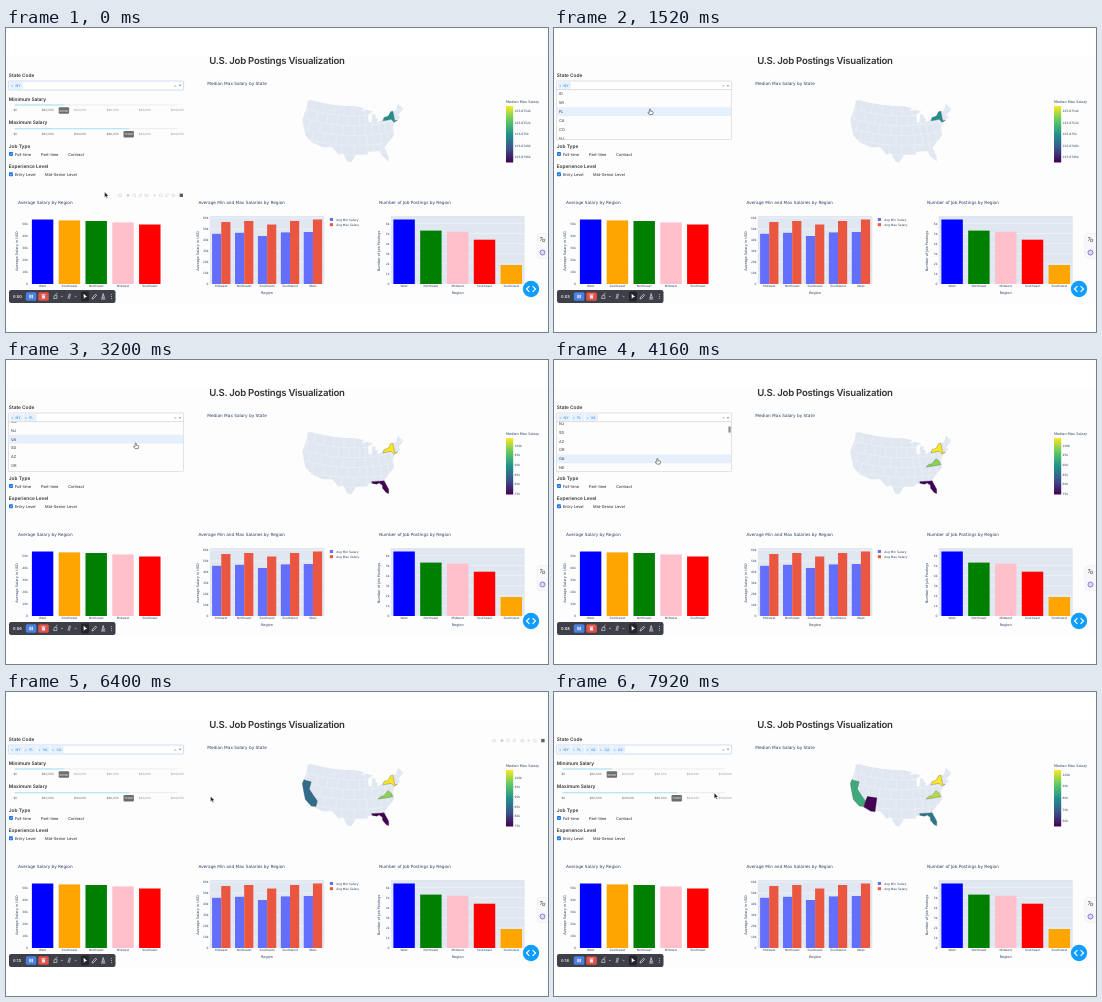
Recreate the animation shown at these times as an HTML page. Size 542 by 304 pixels, loop 8000 ms.

```html
<!DOCTYPE html>
<html lang="en">
<head>
<meta charset="utf-8">
<title>U.S. Job Postings Visualization</title>
<style>
html, body { margin: 0; width: 100%; height: 100%; overflow: hidden; background: #fff; }
svg { display: block; width: 100vw; height: 100vh; font-family: Inter, "Liberation Sans", sans-serif; text-rendering: geometricPrecision; }
.p { font-family: "DejaVu Sans", sans-serif; fill: #2a3f5f; }
</style>
</head>
<body>
<svg id="stage" viewBox="0 0 542 304">
  <defs>
    <clipPath id="menuClip"><rect x="2" y="61.9" width="176" height="49.6"/></clipPath>
    <clipPath id="landClip"></clipPath>
    <linearGradient id="scale" x1="0" y1="1" x2="0" y2="0"></linearGradient>
  </defs>
  <g id="page"></g>
  <g id="map"></g>
  <g id="picker"></g>
  <g id="bar"></g>
  <g id="tools"></g>
  <g id="pointer"></g>
</svg>
<script>
const LOOP = 8000;
const PALE = '#e0e7f1';
const $ = id => document.getElementById(id);

// ---------- helpers ----------
const text = (x, y, size, str, attrs = '') => `<text x="${x}" y="${y}" font-size="${size}" ${attrs}>${str}</text>`;
const plot = (x, y, size, str, attrs = '') => text(x, y, size, str, 'class="p" ' + attrs);
const rect = (x, y, w, h, fill, attrs = '') => `<rect x="${x}" y="${y}" width="${w}" height="${h}" fill="${fill}" ${attrs}/>`;
const line = (d, stroke, w, attrs = '') => `<path d="${d}" fill="none" stroke="${stroke}" stroke-width="${w}" ${attrs}/>`;
const mid = 'text-anchor="middle"', end = 'text-anchor="end"';
const ease = u => { u = Math.min(1, Math.max(0, u)); return u * u * (3 - 2 * u); };
const within = (spans, t) => spans.some(([a, b]) => t >= a && t < b);

// ---------- map ----------
const rad = Math.PI / 180;
const n = (Math.sin(29.5 * rad) + Math.sin(45.5 * rad)) / 2;
const C = Math.cos(29.5 * rad) ** 2 + 2 * n * Math.sin(29.5 * rad);
function albers(west, lat) {
  const r = 140 * Math.sqrt(C - 2 * n * Math.sin(lat * rad)) / n;
  const a = n * (96 - west) * rad;
  return (348 + r * Math.sin(a)).toFixed(2) + ' ' + (r * Math.cos(a) - 76.1).toFixed(2);
}
// closed outline in degrees west and north; edges follow the projection
function geo(pts) {
  const out = [];
  for (let i = 0; i < pts.length; i += 2) {
    const j = (i + 2) % pts.length;
    for (let u = 0; u < 1; u += .2) out.push(albers(pts[i] + (pts[j] - pts[i]) * u, pts[i + 1] + (pts[j + 1] - pts[i + 1]) * u));
  }
  return 'M' + out.join('L') + 'Z';
}

const coast = [124.7,48.4, 122.8,49, 95.2,49, 89.6,48, 92.1,46.8, 88.2,47.3, 84.6,46.4, 87.8,45.2, 87.8,42, 86.3,42,
  85.4,45.3, 83.4,45.1, 83.8,43.8, 82.5,43, 83.4,41.7, 79,42.8, 76.3,43.6, 74.7,45, 71.4,45.1, 69.2,47.4, 67,44.8,
  70.8,43, 70,41.7, 74,40.5, 75.2,38.2, 75.6,35.3, 81.3,31.3, 80.1,27, 80.4,25.2, 82.8,27.8, 84,30.1, 89.6,30.2,
  89.2,29.1, 95,29.2, 97.3,26, 99.1,26.5, 101,29.6, 103.2,29, 106.5,31.8, 111.1,31.3, 117.1,32.5, 120.6,34.5,
  124.4,40.4, 124,46.2];
const states = {
  NY: { pay: 103.9, shape: [79.8,42, 79,43.2, 76.3,43.5, 74.7,45, 73.3,45, 73.5,41, 72,41, 74,40.5, 75.3,42] },
  FL: { pay: 74.8, shape: [87.5,31, 81.6,30.7, 80.1,27, 80.4,25.2, 81.5,25.8, 82.8,27.8, 82.7,29, 84,30.1, 85.3,29.7, 87.5,30.3] },
  VA: { pay: 98.7, shape: [83.6,36.6, 75.9,36.5, 76.3,38, 77.8,39.3, 80.3,37.5, 82,37.5] },
  CA: { pay: 85.2, shape: [124.2,42, 120,42, 120,39, 114.6,35, 114.7,32.7, 117.1,32.5, 120.6,34.5, 124.4,40.4] },
  AZ: { pay: 55.6, shape: [114,37, 109,37, 109,31.3, 111.1,31.3, 114.8,32.5, 114.5,35] }
};

const viridis = ['440154', '3b528b', '21918c', '5ec962', 'fde725'];
$('scale').innerHTML = viridis.map((c, i) => `<stop offset="${i / 4}" stop-color="#${c}"/>`).join('');
function shade(u) {
  const i = Math.min(3, Math.floor(u * 4)), f = u * 4 - i;
  const ch = (c, k) => parseInt(c.substr(2 * k, 2), 16);
  return `rgb(${[0, 1, 2].map(k => Math.round(ch(viridis[i], k) * (1 - f) + ch(viridis[i + 1], k) * f))})`;
}

function land() {
  const outline = `<path d="${geo(coast)}" fill="${PALE}"/>`;
  $('landClip').innerHTML = outline;
  // state lines: bands of four degrees, cells narrower towards the east
  let grid = '';
  for (let lat = 29, k = 0; lat < 49; lat += 4, k++) {
    for (let w = 126 - k % 2 * 3; w > 67; w -= w > 95 ? 6 : 3.6) {
      const step = w > 95 ? 6 : 3.6;
      grid += `M${albers(w, lat + 4)}L${albers(w, lat)}L${albers(w - step, lat)}`;
    }
  }
  return outline + line(grid, '#f6f9fc', .35, 'clip-path="url(#landClip)"');
}

function colored(codes) {
  const pays = codes.map(c => states[c].pay), lo = Math.min(...pays), hi = Math.max(...pays);
  let s = codes.map(c => {
    const u = hi > lo ? (states[c].pay - lo) / (hi - lo) : .5;
    return `<path d="${geo(states[c].shape)}" fill="${shade(u)}" stroke="#444" stroke-width=".3"/>`;
  }).join('');
  const tick = (y, label) => plot(508.6, y + 1.1, 3, label);
  if (hi === lo) {
    for (let d = 4; d >= -4; d -= 2) s += tick(106.2 - d * 5.75, (103.875 + d / 1e4).toFixed(d ? 4 : 3) + 'k');
  } else {
    const gap = hi - lo > 35 ? 10 : 5;
    for (let v = Math.ceil(lo / gap) * gap; v <= hi; v += gap) s += tick(134.3 - 56.3 * (v - lo) / (hi - lo), v + 'k');
  }
  return s;
}

// ---------- bar charts ----------
const hue = { West: 'blue', Southwest: 'orange', Northeast: 'green', Midwest: 'pink', Southeast: 'red' };
function axes(x, w, gap, unit, title, fill = PALE) {
  let s = rect(x, 188, w, 68, fill);
  for (let i = 0, y = 256; y > 188; i++, y -= gap) {
    s += line(`M${x} ${y}h${w}`, '#fff', .35) + plot(x - 1.3, y + 1.1, 3, i ? i * unit + 'k' : 0, end);
  }
  return s + plot(0, 0, 3.5, title, `${mid} transform="translate(${x - 11} 223)rotate(-90)"`);
}
function simpleBars(x, names, tops) {
  return names.map((name, i) => rect(x + 26.8 * (i + .1), tops[i], 21.44, 256 - tops[i], hue[name])
    + plot(x + 26.8 * (i + .5), 259.4, 3, name, mid)).join('');
}
function charts() {
  const first = 23.2, second = 203.8, third = 384.7;
  let s = plot(12, 175.8, 4.25, 'Average Salary by Region') + plot(192.5, 175.8, 4.25, 'Average Min and Max Salaries by Region')
    + plot(373, 175.8, 4.25, 'Number of Job Postings by Region');
  s += axes(first, 134, 12, 10, 'Average Salary in USD', 'none')
    + simpleBars(first, ['West', 'Southwest', 'Northeast', 'Midwest', 'Southeast'], [191.5, 192.4, 193, 194.4, 196.5]);
  s += axes(second, 114.6, 11, 10, 'Average Salary in USD');
  const low = [205.8, 204.8, 208, 204.4, 204], high = [194, 193, 196.5, 193, 191.5];
  ['Midwest', 'Northeast', 'Southeast', 'Southwest', 'West'].forEach((name, i) => {
    const x = second + 22.92 * i;
    s += rect(x + 2.29, low[i], 9.17, 256 - low[i], '#636efa') + rect(x + 11.46, high[i], 9.17, 256 - high[i], '#ea5640')
      + plot(x + 11.46, 259.4, 3, name, mid);
  });
  s += axes(third, 134, 10.1, 1, 'Number of Job Postings')
    + simpleBars(third, ['West', 'Northeast', 'Midwest', 'Southeast', 'Southwest'], [191.5, 202.6, 203.7, 211.7, 237]);
  s += plot(261, 266, 3.5, 'Region', mid) + plot(451.7, 266, 3.5, 'Region', mid);
  ['Min', 'Max'].forEach((kind, i) => s += rect(323.8, 190 + 5.2 * i, 3.2, 3, i ? '#ea5640' : '#636efa')
    + plot(330.3, 192.6 + 5.2 * i, 3, `Avg ${kind} Salary`));
  return s;
}

// ---------- filters ----------
function slider(y, value) {
  const to = 9.3 + 162 * value / 100000;
  let s = rect(8.5, y - .5, 163, 1, '#ececec', 'rx=".5"') + rect(8.5, y - .5, to - 8.5, 1, '#abe2fb', 'rx=".5"');
  for (let i = 0; i < 6; i++) {
    s += text(9.3 + 32.4 * i, y + 6.3, 3, i ? `$${i * 20},000` : '$0', `${mid} fill="${i * 20000 < value ? '#666' : '#999'}"`);
  }
  return s + rect(to - 5.2, y + 2.3, 10.4, 6.4, '#6c6c6c', 'rx="1"') + text(to, y + 6.6, 2.9, value, `${mid} fill="#fff"`);
}
function check(x, y, label, on) {
  return (on ? rect(x, y - 3.7, 4, 4, '#1272e8', 'rx=".8"') + line(`M${x + .9} ${y - 1.7}l.9 .9l1.5 -1.9`, '#fff', .6) : '')
    + text(x + 5.9, y, 3.95, label, 'fill="#222"');
}
function filters() {
  const head = (y, s) => text(2.8, y, 4.8, s, 'font-weight="600" fill="#333"');
  return head(49.2, 'State Code') + head(72.6, 'Minimum Salary') + head(96, 'Maximum Salary')
    + head(119.8, 'Job Type') + head(140.3, 'Experience Level')
    + slider(77, 30000) + slider(100.7, 70000)
    + check(3, 127.6, 'Full-time', true) + check(29.2, 127.6, 'Part-time') + check(56, 127.6, 'Contract')
    + check(3, 148, 'Entry Level', true) + check(33.2, 148, 'Mid-Senior Level');
}

// ---------- floating widgets ----------
function widgets() {
  const w = '#e8e8ea';
  return rect(531, 205.5, 14, 25, '#f8f8fb', 'rx="3" stroke="#e6e6ee" stroke-width=".5"')
    + line('M534 209.5h2.6M535.3 209.5v2.2M534 213l1.4 -1.4M536.6 213.6h2v-2.4h-2z', '#555', .6)
    + '<circle cx="536.5" cy="224.5" r="2.5" fill="#dcd9f6" stroke="#7d76c8" stroke-width=".9"/>'
    + '<circle cx="525" cy="261" r="8.2" fill="#119dff"/>'
    + line('M523.4 258.2l-2.9 2.8l2.9 2.8M526.6 258.2l2.9 2.8l-2.9 2.8', '#fff', 1.1)
    + rect(3, 262, 106.5, 13, '#3d4049', 'rx="2.2"')
    + rect(19.8, 264.2, 10.6, 8.6, '#4a80e4', 'rx="1.6"') + rect(32.2, 264.2, 10.6, 8.6, '#e0524b', 'rx="1.6"')
    + rect(23.3, 266.8, 1.4, 3.4, w) + rect(25.5, 266.8, 1.4, 3.4, w)
    + rect(35.9, 267.2, 3.2, 3.2, w, 'rx=".5"') + rect(35.3, 266.1, 4.4, .6, w)
    + line('M47.5 270.5l1 -3.2h2.4v3.2zM49.5 266.6l2 -1.6M55 268l.9 .9l.9 -.9M62 270.8l1 -4.6h1.4l-1 4.6M68.6 268l.9 .9l.9 -.9', w, .6)
    + rect(75, 263.6, 8, 9.8, '#23252b', 'rx="1.4"')
    + '<path d="M77.6 265.8l3.5 3.3l-1.9 .2l-1.4 1.5z" fill="#fff"/>'
    + line('M86 271l.6 -1.8l3 -3l1.1 1.1l-3 3zM95 271h4.4M96 269.8l1.2 -4.2l1.2 4.2z', w, .7)
    + line('M105.4 266.2v4.6', w, .8, 'stroke-dasharray=".8 1.1"');
}

function modebar(x, y, groups) {
  const icons = ['M-1.6 -1h3.2v2.2h-3.2zM-.5 0h1', 'M-1.6 0h3.2M0 -1.6v3.2', 'M-1.3 -1.3h2.6v2.6h-2.6z', 'M-1.5 1.2l1 -2.4h2l-1 2.4z'];
  let s = '', k = 0;
  groups.forEach(count => {
    for (let i = 0; i < count; i++, x += 6.2, k++) {
      s += line(icons[k % 4], k === 1 ? '#9aa4b2' : '#d0d4da', .55, `transform="translate(${x} ${y})"`);
    }
    x += 1.8;
  });
  return s + rect(x - 1.6, y - 1.7, 3.4, 3.4, '#58616f');
}

// ---------- timeline ----------
const codes = 'ID WI FL CA CO NJ VA SD AZ OR GA NE PA MI NC IL TX OH WA'.split(' ');
const picks = [['NY', -500], ['FL', 1560], ['VA', 3440], ['CA', 5700], ['AZ', 7440]];
const open = [[680, 6160], [7000, 7680]];
const scrolls = [[2560, 2960, 31], [3960, 4700, 68.7], [5200, 5520, 0], [7120, 7280, 12]];
// arrival time and place of each pointer stop
const stops = [[0, 98.6, 164], [640, 175, 58.5], [1320, 96, 81], [2160, 164, 67], [3040, 129.6, 83], [4130, 103.4, 98.5],
  [5620, 70, 81], [6200, 204.6, 104.4], [6960, 120, 56], [7320, 90, 97], [7660, 174, 56], [7920, 160.2, 101]];

const chosenAt = (t, lag = 0) => picks.filter(p => p[1] + lag <= t).map(p => p[0]);
const scrollAt = t => scrolls.reduce((v, [a, b, to]) => v + (to - v) * ease((t - a) / (b - a)), 0);
function cursorAt(t) {
  let [last, x, y] = stops[0];
  for (const [at, nx, ny] of stops) {
    const from = Math.max(last, at - 480), e = ease((t - from) / (at - from || 1));
    x += (nx - x) * e;
    y += (ny - y) * e;
    last = at;
  }
  return [x, y];
}
// the highlighted row only follows the pointer while it moves
function focusAt(t) {
  const next = stops.find(s => s[0] > t);
  const moving = next && t > next[0] - 480;
  const seen = moving ? t : stops.filter(s => s[0] <= t).pop()[0];
  return Math.max(0, Math.floor((cursorAt(seen)[1] - 61.5 + scrollAt(seen)) / 8.85));
}

function picker(t) {
  const chosen = chosenAt(t), isOpen = within(open, t);
  let s = rect(2.4, 53, 175.2, 9, '#fff', `rx="1" stroke="${isOpen ? '#c9ccd2' : '#a9c8ea'}" stroke-width=".6"`);
  chosen.forEach((c, i) => {
    const x = 4.2 + 13.6 * i;
    s += rect(x, 54.6, 12.2, 6, '#e6f1fd', 'rx=".6" stroke="#c2e0ff" stroke-width=".3"')
      + text(x + 1, 58.9, 3.3, '×', 'fill="#3b8fe0"') + text(x + 5.4, 58.9, 3.5, c, 'fill="#1f7fd6"');
  });
  s += text(168, 59, 4, '×', 'fill="#888"');
  s += `<path d="${isOpen ? 'M172.6 58.2h2.8l-1.4 -1.5z' : 'M172.6 56.8h2.8l-1.4 1.5z'}" fill="#888"/>`;
  if (!isOpen) return s;
  if ((t - 680) % 530 < 190) s += line(`M${5 + 13.6 * chosen.length} 55.5v4.4`, '#444', .4);
  const top = scrollAt(t), focus = focusAt(t);
  s += rect(2.4, 61.8, 175.2, 49.8, '#fdfdfd', 'stroke="#c9c9c9" stroke-width=".5"') + '<g clip-path="url(#menuClip)">';
  codes.filter(c => !chosen.includes(c)).forEach((c, i) => {
    const y = 61.5 + 8.85 * i - top;
    if (i === focus) s += rect(2.7, y, 174.6, 8.85, '#e6f0fc');
    s += text(5, y + 5.8, 3.9, c, 'fill="#333"');
  });
  if (top > 32) s += rect(174.4, 61.5 + top * .125, 2.3, 6.6, '#8f8f8f', 'rx="1.1"');
  return s + '</g>';
}

function pointer(t) {
  const [x, y] = cursorAt(t);
  const arrow = '<path d="M0 0V5.4L1.3 4.2L2.2 6.2L3.1 5.8L2.2 3.9H3.9Z" fill="#111" stroke="#fff" stroke-width=".4"/>';
  const palm = '<path d="M-.6 .3Q0 -.5 .6 .3V2.2L2.6 2.6Q3.3 2.8 3.2 3.6L2.6 5.6H-.6L-2.2 3.6Q-1.8 2.9 -.6 3.6Z" fill="#fff" stroke="#333" stroke-width=".55"/>';
  return `<g transform="translate(${x.toFixed(2)} ${y.toFixed(2)})">${within(open, t) || y < 62 ? palm : arrow}</g>`;
}

function tools(t) {
  const sec = Math.floor(t / 500 + .22);
  let s = text(7, 270, 3.9, '0:' + String(sec).padStart(2, '0'), 'fill="#fff" font-weight="600"');
  if (t < 320) s += modebar(114, 167.3, [1, 4, 4]);
  if (within([[6200, 6800]], t)) s += modebar(488, 48.6, [1, 3, 3]);
  return s;
}

$('page').innerHTML = rect(0, 28, 542, 248, '#fdfdfd')
  + text(271, 36.2, 9.6, 'U.S. Job Postings Visualization', `${mid} font-weight="600" letter-spacing="-.26" fill="#333"`)
  + filters() + plot(201.3, 57, 4.25, 'Median Max Salary by State') + land()
  + plot(500, 75.3, 3.5, 'Median Max Salary') + rect(500, 78, 7.2, 56.5, 'url(#scale)') + charts();
$('bar').innerHTML = widgets();

const shown = {};
function put(id, html) {
  if (shown[id] !== html) $(id).innerHTML = shown[id] = html;
}
const start = performance.now();
function frame() {
  const t = (performance.now() - start) % LOOP;
  put('map', colored(chosenAt(t, 180)));
  put('picker', picker(t));
  put('tools', tools(t));
  put('pointer', pointer(t));
  requestAnimationFrame(frame);
}
frame();
</script>
</body>
</html>
```
